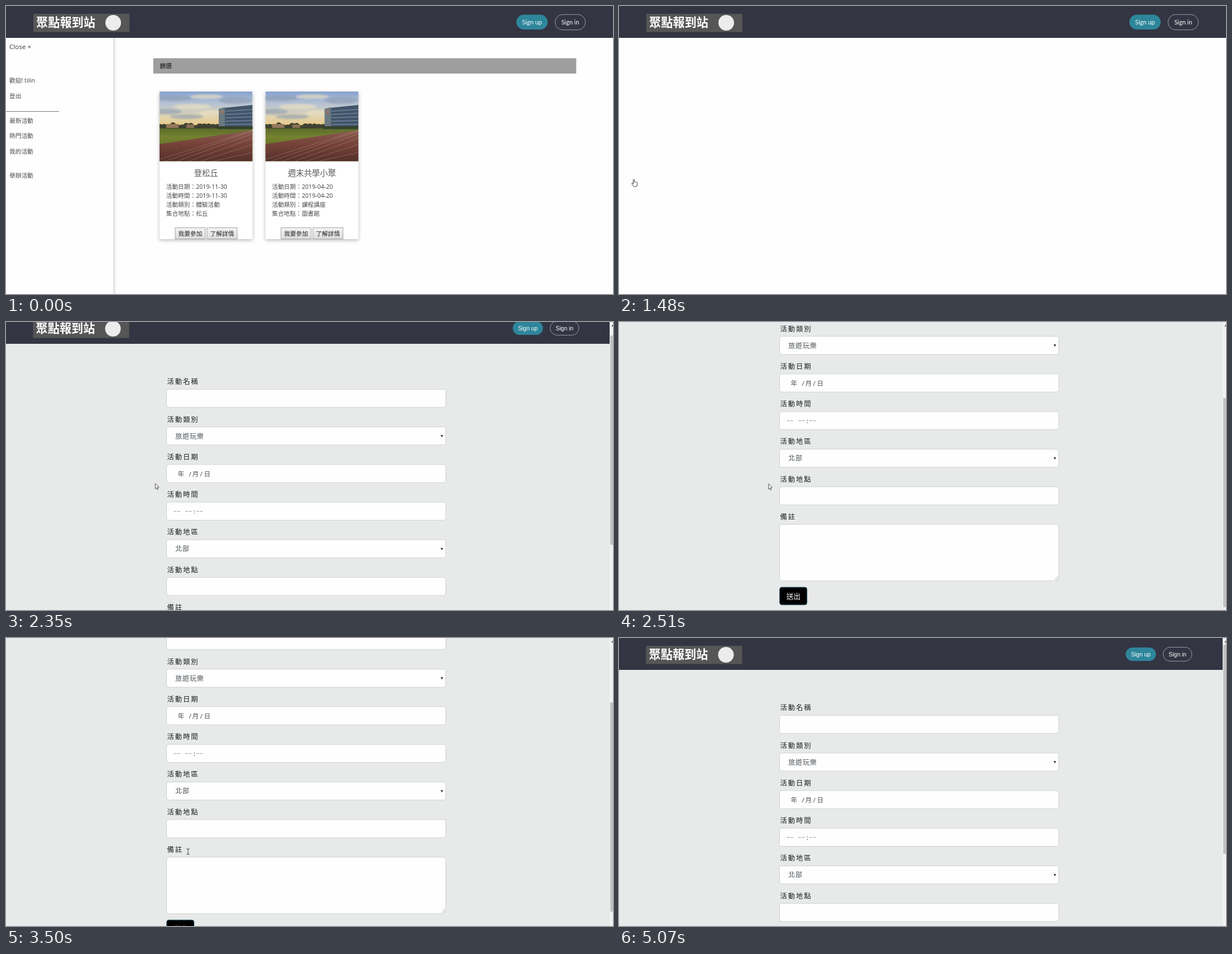
An HTML page that plays this animation: 1087x515 px, repeating every 5680 ms.

```html
<!DOCTYPE html>
<html lang="zh-Hant">
<head>
<meta charset="utf-8">
<title>活動報名</title>
<style>
html, body { margin: 0; width: 100%; height: 100%; overflow: hidden; background: #fefefe; }
svg { display: block; width: 100vw; height: 100vh; }
text { font-family: "Noto Sans", "Noto Sans CJK TC", "Noto Sans CJK", sans-serif; white-space: pre; }
.arial { font-family: "Liberation Sans", Arial, sans-serif; }
.lato { font-family: Lato, sans-serif; }
.mono { font-family: "Noto Sans Mono", monospace; }
.thin { font-weight: 300; }
.card { filter: drop-shadow(0 2px 3px rgba(0, 0, 0, .28)); }
.cloud { filter: blur(1.6px); }
</style>
</head>
<body>
<svg id="stage" viewBox="0 0 1087 515" preserveAspectRatio="none"></svg>
<script>
const LOOP = 5680;

const rect = (x, y, w, h, fill, more = '') =>
  `<rect x="${x}" y="${y}" width="${w}" height="${h}" fill="${fill}" ${more}/>`;
const poly = (points, fill, more = '') => `<polygon points="${points}" fill="${fill}" ${more}/>`;
const line = (d, stroke, width, more = '') =>
  `<path d="${d}" fill="none" stroke="${stroke}" stroke-width="${width}" ${more}/>`;
// Text placed by the vertical middle of its glyphs
const text = (x, mid, str, size, fill, more = '') =>
  `<text x="${x}" y="${mid + size * .37}" font-size="${size}" fill="${fill}" ${more}>${str}</text>`;
const centred = 'text-anchor="middle"';
const thin = 'class="thin"';

function logo(x) {
  return rect(x, 14, 172, 32.5, '#565656') +
    text(x + 5, 29.5, '聚點報到站', 21.2, '#fff', 'font-weight="700"') +
    `<circle cx="${x + 143}" cy="30" r="14" fill="#ececec"/>`;
}

function pill(x, y, w, h, label, fill, stroke, font, size) {
  return rect(x, y, w, h, fill, `rx="${h / 2}" stroke="${stroke}" stroke-width=".8"`) +
    text(x + w / 2, 28.7, label, size, '#fff', `class="${font}" ${centred}`);
}

function photo() {
  const clouds = [[24, 12, 34, 5], [84, 9, 30, 4], [136, 16, 30, 6], [58, 27, 34, 5], [14, 36, 26, 5], [92, 38, 20, 5], [48, 45, 30, 4]]
    .map(([x, y, rx, ry], i) =>
      `<ellipse class="cloud" cx="${x}" cy="${y}" rx="${rx}" ry="${ry}" fill="${i % 2 ? '#f0e3c0' : '#8d9cb0'}" opacity=".6"/>`).join('');
  let windows = '', lanes = '', trees = '';
  for (let i = 0; i < 5; i++) windows += line(`M118 ${35 + i * 6}L166.5 ${32 + i * 6.6}`, '#8ea1b2', .9);
  for (let i = 0; i < 6; i++) lanes += line(`M166.5 ${69 + i * i * 1.6}L${i * 21 - 12} 125`, '#d3b3a8', .6, 'opacity=".55"');
  for (let i = 0; i < 14; i++) trees += `<ellipse cx="${i * 8}" cy="${62 + i % 3}" rx="6" ry="${4 + i * 5 % 4}" fill="#3f4230"/>`;
  return `<g clip-path="url(#frame)">` +
    rect(0, 0, 166.5, 124.5, 'url(#sky)') + clouds + trees +
    rect(12, 58, 22, 7, '#94785a') + rect(48, 59, 14, 6, '#8a7058') +
    poly('106,31 117,28 117,67 106,67', '#6a7880') + poly('117,29 166.5,24 166.5,67 117,67', '#42556b') +
    windows + rect(109, 34, 5, 5, '#a3745f') +
    rect(0, 66, 166.5, 60, 'url(#grass)') + rect(104, 62, 63, 5, '#35422e') +
    poly('166.5,69 0,94 0,125 166.5,125', 'url(#track)') + lanes + '</g>';
}

function card(x, title, date, kind, place) {
  const rows = ['活動日期：' + date, '活動時間：' + date, '活動類別：' + kind, '集合地點：' + place];
  const button = (bx, label) =>
    rect(bx, 243.5, 54, 20, 'url(#button)', 'stroke="#a6a6a6" stroke-width="1"') +
    text(bx + 27, 254, label, 10.7, '#222', `${thin} ${centred}`);
  return `<g transform="translate(${x} 153)">` +
    rect(0, 0, 166.5, 264, '#fff', 'class="card"') + photo() +
    text(83.3, 145.5, title, 14.3, '#555', `${thin} ${centred}`) +
    rows.map((row, i) => text(11.7, 170.5 + i * 16, row, 10.7, '#4c4c4c', thin)).join('') +
    button(28, '我要參加') + button(85, '了解詳情') + '</g>';
}

function home() {
  const links = [[133.5, '歡迎! tilin'], [161.5, '登出'], [205, '最新活動'], [232.5, '熱門活動'], [260, '我的活動'], [303.5, '舉辦活動']];
  return rect(0, 57, 1087, 458, '#fefefe') +
    `<g id="content">` + rect(192, 57, 6, 458, 'url(#edge)') + rect(0, 57, 192, 458, '#fefefe') +
    rect(0, 289, 192, 28, '#ccc', 'id="hover"') +
    text(6, 72.5, 'Close ×', 11.6, '#444') +
    links.map(([y, label]) => text(6, y, label, 10.7, '#4c4c4c', thin)).join('') +
    rect(0, 188, 95, 1, '#777a8c') +
    rect(263.7, 93.4, 757.5, 27.4, '#9e9e9e') + text(275.5, 107.5, '篩選', 10.7, '#111', thin) +
    card(275, '登松丘', '2019-11-30', '體驗活動', '松丘') +
    card(464.5, '週末共學小聚', '2019-04-20', '課程講座', '圖書館') + '</g>' +
    rect(0, 0, 1087, 57, '#333543') + logo(49) +
    pill(914, 15.5, 56, 26.5, 'Sign up', '#2e869b', 'none', 'lato', 11) +
    pill(983.2, 15.2, 54.4, 27.5, 'Sign in', 'none', '#b4b5bd', 'lato', 11);
}

function form() {
  const labels = ['活動名稱', '活動類別', '活動日期', '活動時間', '活動地區', '活動地點', '備註'];
  const border = 'rx="4" stroke="#ced1d4" stroke-width="1"';
  const gap = 67.27;
  const fields = labels.map((label, i) =>
    text(288.5, 124.7 + i * gap, label, 12.4, '#1d2124', 'font-weight="500" letter-spacing="1.9"') +
    rect(287.5, 138.3 + i * gap, 500, i < 6 ? 32.4 : 101, '#fefefe', border)).join('');
  const select = (i, value) => {
    const y = 154.8 + i * gap;
    return text(303.3, y, value, 12, '#4c5257', `${thin} letter-spacing=".8"`) +
      poly(`778.3,${y - 2} 782.7,${y - 2} 780.5,${y + 2.4}`, '#333');
  };
  const dateY = 154.8 + 2 * gap, timeY = 154.8 + 3 * gap;
  const date = [[307.5, '年'], [327.5, '/'], [333.5, '月'], [347.5, '/'], [354.5, '日']]
    .map(([x, part]) => text(x, dateY, part, 11.6, '#4c5257', thin)).join('');
  const dashes = line(`M300.5 ${timeY}h5m1.5 0h5m9 0h5m1.5 0h5m8.5 0h5m1.5 0h5`, '#8a8f94', .9);
  const time = dashes + text(334, timeY, ':', 11.35, '#333', 'class="mono"');
  return rect(0, 0, 1087, 515, '#e8eae9') + `<g id="page">` +
    rect(0, 0, 1081, 57, '#333543') + logo(48.5) +
    pill(907.5, 17, 54, 24, 'Sign up', '#2e869b', 'none', 'arial', 10.4) +
    pill(974.5, 16.5, 51.5, 25, 'Sign in', 'none', '#b4b5bd', 'arial', 10.4) +
    fields + select(1, '旅遊玩樂') + select(4, '北部') + date + time +
    line('M780 641.5L786.5 635M783.5 641.5L786.5 638.5', '#888', .8) +
    rect(287.7, 654.2, 49, 31.6, '#000', 'rx="4" stroke="#1f5b6c" stroke-width=".9"') +
    text(300, 670, '送出', 12.6, '#fff', 'font-weight="500"') + '</g>' +
    rect(1081, 0, 6, 515, '#f1f1f1') + poly('1084,8 1087,4.5 1087,8', '#555') +
    rect(1082, 0, 5, 374, '#c1c1c1', 'id="thumb"');
}

const cursors =
  `<g id="arrow">${poly('.4,.4 .4,9.8 2.5,7.9 4,11.3 5.6,10.6 4.1,7.3 7,7.1', '#fff', 'stroke="#222" stroke-width=".8" stroke-linejoin="round"')}</g>` +
  `<g id="hand"><path d="M-1 1.2Q0 -.2 1 1.2V5.2Q2.3 4.4 3 5.5Q4.3 4.9 4.8 6Q6 5.6 6.3 6.8V9.8Q6.2 13.5 2.8 13.5H1Q-.8 13.2-1.8 11L-3.7 8.2Q-3.6 6.8-2.3 7.3L-1 8.6Z" fill="#fff" stroke="#222" stroke-width=".9"/></g>` +
  `<g id="beam">${line('M-2.6 -5Q-.5 -5 0 -4.2Q.5 -5 2.6 -5M0 -4.2V4.2M-2.6 5Q-.5 5 0 4.2Q.5 5 2.6 5', '#222', .9)}</g>`;

const gradient = (id, stops, dir = 'x2="0" y2="1"') => `<linearGradient id="${id}" ${dir}>` +
  stops.map(([at, colour, alpha = 1]) => `<stop offset="${at}" stop-color="${colour}" stop-opacity="${alpha}"/>`).join('') + '</linearGradient>';

document.getElementById('stage').innerHTML = '<defs>' +
  gradient('sky', [[0, '#86a3d0'], [.18, '#b7c3d3'], [.36, '#e0d4b0'], [.52, '#eac67c']]) +
  gradient('grass', [[0, '#5c6b2c'], [.25, '#75822f'], [.5, '#66752a']]) +
  gradient('track', [[0, '#8a5c4f'], [.45, '#754238'], [1, '#54302c']]) +
  gradient('button', [[0, '#f4f4f4'], [1, '#dcdcdc']]) +
  gradient('edge', [[0, '#000', .13], [1, '#000', 0]], '') +
  `<clipPath id="frame"><rect width="166.5" height="124.5"/></clipPath></defs>` +
  `<g id="home">${home()}</g><g id="form">${form()}</g><g id="cursor">${cursors}</g>`;

const el = id => document.getElementById(id);
const parts = Object.fromEntries(
  ['home', 'content', 'hover', 'form', 'page', 'thumb', 'cursor', 'arrow', 'hand', 'beam'].map(id => [id, el(id)]));
const show = (id, on) => parts[id].setAttribute('display', on ? 'inline' : 'none');
const move = (id, x, y) => parts[id].setAttribute('transform', `translate(${x} ${y})`);

// Cursor legs: start, end, steps, from, to
const legs = [
  [110, 630, 9, [1068, 557], [29, 312]],
  [700, 760, 2, [29, 312], [26.5, 309.5]],
  [1870, 2280, 7, [26.5, 309.5], [267, 288.5]],
  [2510, 2720, 3, [267, 288.5], [268, 290]],
  [2880, 3310, 8, [268, 290], [326, 382]],
  [4130, 4690, 10, [326, 381], [918, 470]],
  [4750, 5070, 5, [918, 470], [1046, 522]]
];

const scrolls = [[0, 0], [2350, 18], [2420, 100], [2510, 180], [2660, 200], [2720, 204],
  [3450, 150], [3517, 80], [3583, 25], [3650, 0]];

function cursorAt(t) {
  const [start, end, steps, from, to] = legs.filter(leg => leg[0] <= t).pop() || legs[0];
  const p = t < start ? 0 : Math.min(1, (Math.floor((t - start) / (end - start) * (steps - 1) + 1e-6) + 1) / steps);
  const k = start === 110 ? 1 - (1 - p) ** 2 : p;
  return from.map((v, i) => v + (to[i] - v) * k);
}

function draw(t) {
  const onForm = t >= 1670;
  const [x, y] = cursorAt(t);
  const hover = !onForm && x < 192 && y > 289 && y < 317;
  const beam = t >= 2880 && t < 3810 && x > 287;
  const scroll = scrolls.filter(s => s[0] <= t).pop()[1];

  show('home', !onForm);
  show('content', t < 1480);
  show('hover', hover);
  show('form', onForm);
  move('page', 0, -scroll);
  move('thumb', 0, 12 + scroll * .689);

  show('cursor', t >= 110 && t < 5070);
  show('hand', hover);
  show('beam', beam);
  show('arrow', !hover && !beam);
  move('cursor', x, y);
}

const begin = performance.now();
function tick() {
  draw((performance.now() - begin) % LOOP);
  requestAnimationFrame(tick);
}
tick();
</script>
</body>
</html>
```
